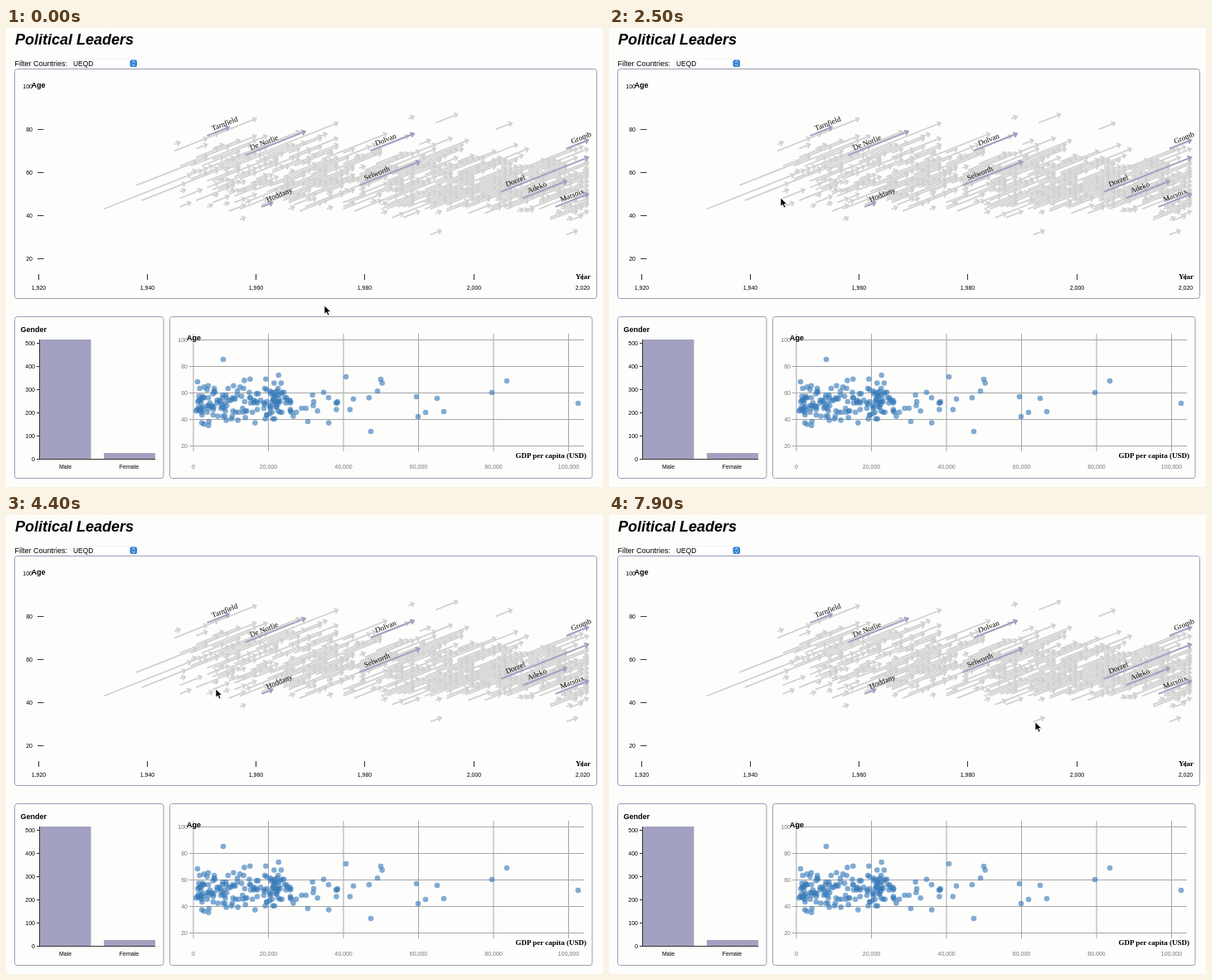
An HTML page that plays this animation: 720 px wide and 554 px high, repeating every 8000 ms.

```html
<!DOCTYPE html>
<html lang="en">
<head>
<meta charset="utf-8">
<title>Political Leaders</title>
<style>
  html, body { margin: 0; width: 100%; height: 100%; overflow: hidden; background: #fdfdfc; }
  svg { display: block; width: 720px; height: 554px; font: 7px "Liberation Sans", Arial, sans-serif; }
  .bold { font-weight: bold; font-size: 9px; }
  .serif { font-family: "Liberation Serif", Times, serif; font-size: 9px; }
  .panel { fill: none; stroke: #9d9db4; }
  .tick { stroke: #333; }
  .grid { stroke: #a6a6a8; }
  .bar { fill: #a3a1c1; }
  .tip text { font-weight: bold; font-size: 8.2px; }
</style>
</head>
<body>
<svg id="stage" viewBox="0 0 720 554"></svg>
<script>
const stage = document.getElementById('stage');
const LOOP = 8000, STEP = 100;

function add(tag, attrs, parent = stage, content) {
  const el = document.createElementNS('http://www.w3.org/2000/svg', tag);
  for (const key in attrs) el.setAttribute(key, attrs[key]);
  if (content !== undefined) el.textContent = content;
  parent.appendChild(el);
  return el;
}
const text = (x, y, str, attrs = {}, parent) => add('text', { x, y, ...attrs }, parent, str);
const line = (x1, y1, x2, y2, name = 'tick') => add('line', { x1, y1, x2, y2, class: name });
const panel = (x, y, width, height) => add('rect', { x, y, width, height, rx: 3, class: 'panel' });
const bar = (x, y, width) => add('rect', { x, y, width, height: 520.5 - y, class: 'bar' });
const END = { 'text-anchor': 'end' }, MID = { 'text-anchor': 'middle' };
const crisp = v => Math.floor(v) + .5;

function randomFrom(seed) {
  return () => {
    seed = (seed * 1664525 + 1013904223) >>> 0;
    return seed / 4294967296;
  };
}
const bell = rnd => (rnd() + rnd() + rnd() - 1.5) * 2;
const decay = rnd => -Math.log(1 - rnd());

// Header and filter
text(11, 20, 'Political Leaders', { style: 'font: italic bold 18px "Liberation Sans", Arial, sans-serif' });
text(10.5, 46, 'Filter Countries:', { 'font-size': 9 });
add('rect', { x: 78, y: 37.5, width: 81, height: 10.5, rx: 2.5, fill: '#fff', stroke: '#efeff2', 'stroke-width': .6 });
text(81, 46, 'UEQD', { 'font-size': 8.4 });
add('rect', { x: 149.5, y: 38.5, width: 8.5, height: 8.5, rx: 2, fill: '#2f7fd6' });
add('path', { d: 'M152 41.8l1.8-1.7 1.8 1.7M152 43.8l1.8 1.7 1.8-1.7', fill: 'none', stroke: '#fff', 'stroke-width': .9 });

// Timeline: each arrow spans one term, ageing one year per year
const yearX = year => 39 + (year - 1920) * 6.565;
const ageY = age => 278.3 - (age - 20) * 2.6;
const SLOPE = Math.atan2(2.6, 6.565);

function arrow([year, age, span]) {
  const point = (x, y) => x.toFixed(1) + ' ' + y.toFixed(1);
  const x = yearX(year + span), y = ageY(age + span), tip = point(x, y);
  const leg = turn => point(x - 5 * Math.cos(SLOPE + turn), y + 5 * Math.sin(SLOPE + turn));
  return `M${point(yearX(year), ageY(age))}L${tip}M${leg(.65)}L${tip}L${leg(-.65)}`;
}
const arrows = (list, stroke, width) =>
  add('path', { d: list.map(arrow).join(''), fill: 'none', stroke, 'stroke-width': width });

function terms() {
  const rnd = randomFrom(1945), list = [];
  for (let i = 0; i < 640; i++) {
    const since = Math.floor(rnd() ** .9 * 76);
    const age = Math.round(59.5 - since * .125 + 7.5 * bell(rnd));
    const span = Math.min(1 + Math.floor(decay(rnd) * 3.5), 13, 76 - since);
    const lowest = 43 - since * .1, highest = 81 - since * .1;
    if (age >= lowest && age + span <= highest) list.push([1945 + since, age, span]);
  }
  return list;
}
// year, age, years in office
const longTerms = [[1932, 43, 36], [1939, 47, 36], [1938, 54, 11], [1950, 75, 10]];
const rareTerms = [[1993, 83, 4], [1988, 85, 1], [2004, 80, 3], [1957, 38, 1], [1992, 31, 2], [2017, 31, 2]];
const named = [
  ['Tarnfield', 1951, 77, 4], ['De Norlie', 1958, 68, 11], ['Dolvan', 1981, 70, 8],
  ['Selworth', 1979, 54, 11], ['Hoddany', 1961, 44, 2], ['Gromb', 2017, 71, 4],
  ['Dorzel', 2005, 51, 16], ['Adeko', 2009, 48, 8], ['Marsoix', 2015, 44, 6]
];

panel(10.5, 49.5, 702, 277);
arrows([...terms(), ...longTerms, ...rareTerms], '#d1d1d1', 1.8);
arrows(named.map(n => n.slice(1)), '#a09fc0', 2);
const hoverLine = arrows([[1945, 43, 8]], '#77777c', 2);
for (const [name, year, age] of named) {
  const x = yearX(year) + 7, y = ageY(age) - 6;
  text(0, 0, name, { class: 'serif', transform: `translate(${x} ${y}) rotate(${-SLOPE * 180 / Math.PI})` });
}
for (let age = 20; age <= 100; age += 20) {
  const y = crisp(ageY(age));
  text(32, y + 2.4, age, END);
  if (age < 100) line(38, y, 45.5, y);
}
for (let year = 1920; year <= 2020; year += 20) {
  const x = crisp(yearX(year));
  line(x, 297, x, 304);
  text(x, 316, year.toLocaleString('en-US'), MID);
}
text(30.5, 71.5, 'Age', { class: 'bold' });
text(705, 303, 'Year', { class: 'serif', 'font-weight': 'bold', ...END });

// Gender bars
panel(10.5, 348.5, 179.5, 195);
text(17.5, 366.5, 'Gender', { class: 'bold' });
bar(41, 376, 61.5);
bar(118, 513, 62);
for (let n = 0; n <= 500; n += 100) {
  const y = 520.5 - n * .28;
  line(37, y, 41, y);
  text(35, y + 2.6, n, END);
}
line(40.5, 376, 40.5, 520.5);
line(41, 520.5, 180, 520.5);
text(71.5, 532, 'Male', MID);
text(148.5, 532, 'Female', MID);

// Scatter plot
panel(197.5, 348.5, 509.5, 195);
for (let age = 20; age <= 100; age += 20) {
  const y = 504.5 - (age - 20) * 1.6;
  line(221, y, 697, y, 'grid');
  text(219, y + 2.6, age, { ...END, fill: '#777' });
}
for (let i = 0; i <= 5; i++) {
  const x = 226 + i * 90.5;
  line(x, 369, x, 511, 'grid');
  text(x, 532, (i * 20000).toLocaleString('en-US'), { ...MID, fill: '#777' });
}
function leaders() {
  const rnd = randomFrom(77), list = [];
  const place = x => list.push([x, 451 + Math.round(bell(rnd) * 7.5) * 1.6]);
  for (let i = 0; i < 150; i++) place(229 + Math.min(decay(rnd) * 62, 235 * rnd() ** .5));
  for (let i = 0; i < 32; i++) place(324 + bell(rnd) * 7);
  return list;
}
const farPoints = [
  [262, 400], [410, 421], [452, 424], [604, 426], [586, 440], [690, 453],
  [520, 447], [495, 445], [528, 463], [506, 464], [497, 469], [440, 487]
];
const dots = add('g', { fill: '#3579b8', 'fill-opacity': .62 });
for (const [cx, cy] of [...leaders(), ...farPoints]) add('circle', { cx, cy, r: 3.3 }, dots);
text(218, 377, 'Age', { class: 'bold' });
text(700, 519, 'GDP per capita (USD)', { class: 'serif', 'font-weight': 'bold', ...END });

// Tooltip
const tip = add('g', { class: 'tip' });
add('rect', { x: 221, y: 214, width: 122, height: 64, fill: '#b5b5b8', opacity: .75 }, tip);
add('rect', { x: 219, y: 212, width: 122, height: 64, fill: '#fefefe', stroke: '#d8d8da', 'stroke-width': .6 }, tip);
text(224.5, 226, 'Zilp', { style: 'font-size: 9.5px' }, tip);
text(224.5, 235.5, 'Austria, 1945-1953', { 'font-style': 'italic' }, tip);
['Age at inauguration: 43', 'Time in office: 8', 'GDP/capita: 0'].forEach((row, i) => {
  const y = 249 + i * 9.8;
  add('circle', { cx: 229.5, cy: y - 2.6, r: 1.3 }, tip);
  text(238, y, row, {}, tip);
});

// Pointer: time, x, y of its tip
const pointer = add('path', {
  d: 'M0 0V10.2L2.4 8 4.2 12 6 11.2 4.3 7.4H7.6Z', fill: '#000', stroke: '#fff', 'stroke-width': .7
});
const track = [
  [0, 384, 335], [1000, 151, 208], [2500, 207, 205], [3000, 219, 211],
  [4000, 219, 211], [4400, 253, 210], [5600, 369, 216], [7900, 514, 250], [LOOP, 514, 250]
];

function pointerAt(t) {
  const i = track.findIndex(p => p[0] > t);
  const [t0, x0, y0] = track[i - 1], [t1, x1, y1] = track[i];
  const k = (t - t0) / (t1 - t0), ease = k * k * (3 - 2 * k);
  return [x0 + (x1 - x0) * ease, y0 + (y1 - y0) * ease];
}

function draw(now) {
  const t = Math.floor((now % LOOP) / STEP) * STEP;
  const [x, y] = pointerAt(t);
  pointer.setAttribute('transform', `translate(${x.toFixed(1)} ${y.toFixed(1)})`);
  const shown = t >= 3000 && t < 4100 ? 'visible' : 'hidden';
  tip.setAttribute('visibility', shown);
  hoverLine.setAttribute('visibility', shown);
  requestAnimationFrame(draw);
}
draw(performance.now());
</script>
</body>
</html>
```
